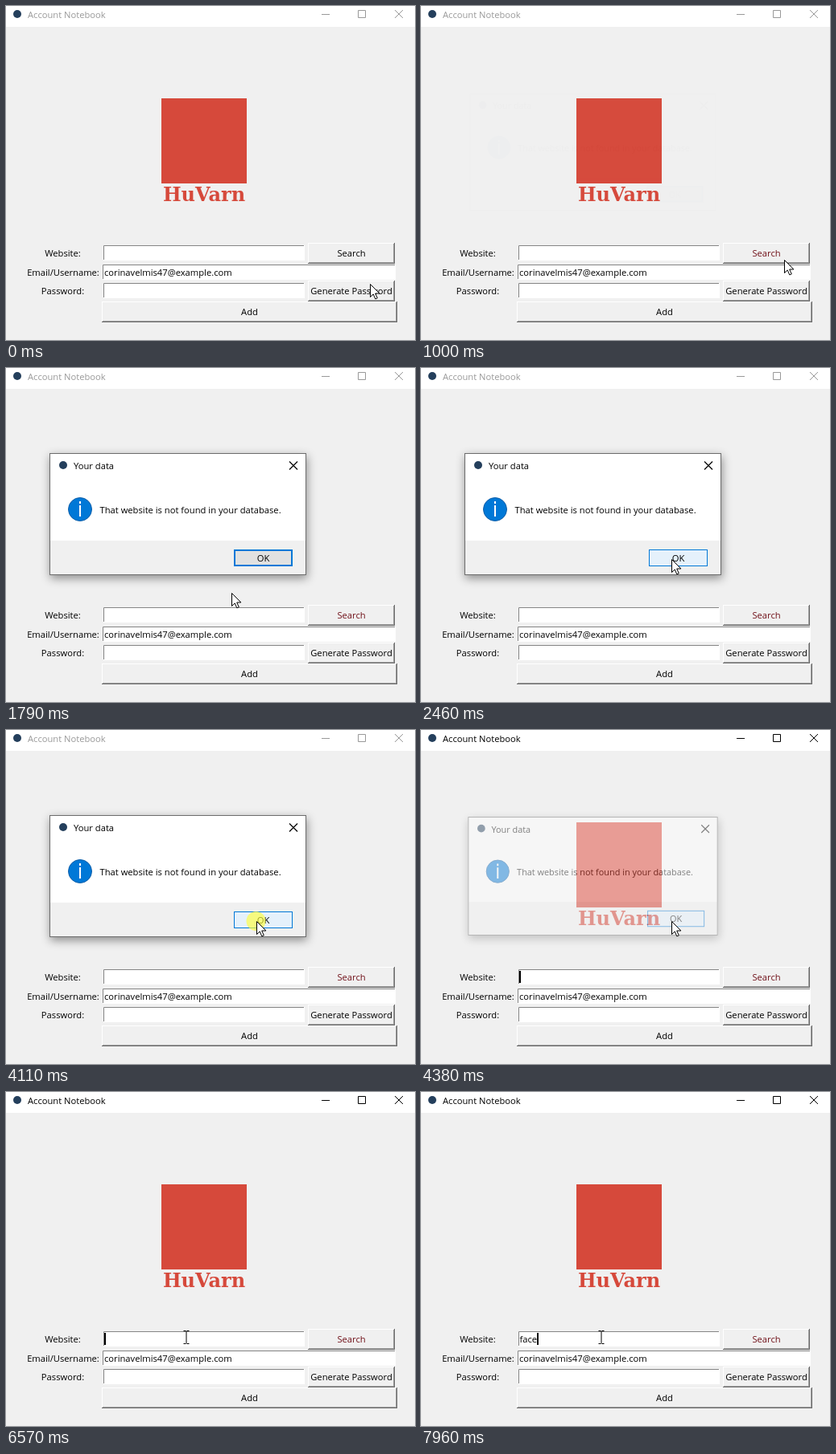
These frames come from a looping animation (508 by 416 pixels, 8000 ms). An HTML page:

```html
<!DOCTYPE html>
<html lang="en">
<head>
<meta charset="utf-8">
<title>Account Notebook</title>
<style>
html, body { margin: 0; width: 100%; height: 100%; overflow: hidden; background: #f0f0f0; }
svg { display: block; width: 508px; height: 416px; }
text { font: 11.2px "Open Sans", "Noto Sans", sans-serif; white-space: pre; }
.mid { text-anchor: middle; }
.brand { font: bold 24px "DejaVu Serif", "Noto Serif", serif; fill: #d6493b; }
.shadow { filter: drop-shadow(1px 4px 6px rgba(0, 0, 0, .42)); }
</style>
</head>
<body>
<svg id="stage" viewBox="0 0 508 416">
  <rect width="508" height="416" fill="#f0f0f0"/>
  <rect width="508" height="26" fill="#fff"/>
  <circle cx="14" cy="10" r="5" fill="#243f5c"/>
  <text id="title" x="27" y="15">Account Notebook</text>
  <path id="controls" fill="none" d="M392 10.5h10M437.5 5.5h9v9h-9zM483 5l10 10M493 5l-10 10"/>

  <rect x="193" y="115" width="106" height="106" fill="#d6493b"/>
  <text class="brand mid" x="246" y="243">HuVarn</text>

  <g id="form"></g>
  <text id="typed" x="122.5" y="312"></text>
  <rect id="caret" y="300" width="2" height="15"/>

  <g id="dialog">
    <rect class="shadow" x="54" y="106" width="319" height="152" fill="#fff"/>
    <rect x="54" y="215" width="319" height="43" fill="#f0f0f0"/>
    <rect x="54.5" y="106.5" width="318" height="151" fill="none" stroke="#6c6c6c"/>
    <circle cx="71" cy="121" r="5" fill="#243f5c"/>
    <text x="84" y="126">Your data</text>
    <path d="M352 116.500l10 10M362 116.500l-10 10" stroke="#000" stroke-width="1.200"/>
    <circle cx="92" cy="176" r="14.500" fill="#0078d7" stroke="#0f5fa8"/>
    <path d="M91 166h2v3h-2zM91 171h2v14h-2z" fill="#fff"/>
    <text x="116.500" y="181">That website is not found in your database.</text>
    <rect id="ok"/>
    <text class="mid" x="319.500" y="241">OK</text>
  </g>

  <circle id="click" r="12" fill="#ffff3c" opacity=".65"/>
  <path id="arrow" d="M.5.5v16l3.700-3.600 2.600 6 2.500-1.100-2.600-5.800h5.200z" fill="#fff" stroke="#000"/>
  <path id="beam" d="M-3.500-7.500h3M.5-7.500h3M0-7V8M-3.500 8.500h3M.5 8.500h3" fill="none" stroke="#000"/>
</svg>
<script>
const LOOP = 8000;
const $ = id => document.getElementById(id);
const set = (el, attrs) => { for (const k in attrs) el.setAttribute(k, attrs[k]); };
const show = (el, on) => el.setAttribute('visibility', on ? 'visible' : 'hidden');
const within = (t, a, b) => t >= a && t < b;
const clamp = v => Math.max(0, Math.min(1, v));

const label = (text, x, y, id = '') => `<text class="mid" id="${id}" x="${x}" y="${y}">${text}</text>`;

const button = (text, x, y, w, h, id) => `
  <rect x="${x}" y="${y}" width="${w}" height="${h}" fill="#696969"/>
  <rect x="${x}" y="${y}" width="${w - 1}" height="${h - 1}" fill="#fff"/>
  <rect x="${x + 1}" y="${y + 1}" width="${w - 2}" height="${h - 2}" fill="#a0a0a0"/>
  <rect x="${x + 1}" y="${y + 1}" width="${w - 3}" height="${h - 3}" fill="#f0f0f0"/>
  ${label(text, x + w / 2, y + 17, id)}`;

const entry = (x, y, w, h) => `
  <rect x="${x}" y="${y}" width="${w}" height="${h}" fill="#fff"/>
  <path d="M${x + .5} ${y + h - 1}V${y + .5}H${x + w - 1}" fill="none" stroke="#858585"/>`;

$('form').innerHTML =
  label('Website:', 70.5, 312) + label('Email/Username:', 71, 336) + label('Password:', 70.5, 359) +
  entry(121, 298, 250, 19) + entry(120, 322, 364, 19) + entry(121, 345, 250, 19) +
  '<text x="122" y="336">corinavelmis47@example.com</text>' +
  button('Search', 375, 295, 108, 26, 'search') +
  button('Generate Password', 375, 342, 108, 26) +
  button('Add', 119, 368, 367, 26);

// Pointer stops: time, x, y
const path = [
  [0, 452, 346], [60, 452, 346], [70, 451, 333], [200, 451, 333], [340, 451, 316],
  [1400, 451, 316], [1590, 341, 315], [1780, 341, 315], [1790, 280, 280],
  [1930, 277, 271], [2460, 311, 238], [4600, 311, 238], [5040, 392, 416],
  [6160, 266, 317], [6170, 266, 317], [6300, 222, 278], [6430, 222, 278],
  [6440, 223, 292], [6570, 224, 305], [LOOP, 224, 305]
];
const keys = [[7430, 'f'], [7560, 'a'], [7630, 'c'], [7830, 'e']];

function pointer(t) {
  const i = path.findIndex(p => p[0] > t);
  const [t0, x0, y0] = path[i - 1], [t1, x1, y1] = path[i];
  const k = (t - t0) / (t1 - t0);
  return [x0 + (x1 - x0) * k, y0 + (y1 - y0) * k];
}

function drawDialog(t) {
  const closing = t > 4240;
  const k = closing ? 1 - clamp((t - 4240) / 260) : 1 - (1 - clamp((t - 1000) / 240)) ** 2;
  const scale = closing ? .95 + .05 * k : .96 + .04 * k;
  show($('dialog'), k > 0);
  set($('dialog'), {
    opacity: k,
    transform: `translate(213.5 182) scale(${scale}) translate(-213.5 -182)`
  });
  const hover = t >= 2330, b = hover ? 1 : 2;
  set($('ok'), {
    x: 283 + b / 2, y: 226 + b / 2, width: 73 - b, height: 21 - b,
    fill: hover ? '#e5f1fb' : '#e1e1e1', stroke: '#0078d7', 'stroke-width': b
  });
}

function draw(t) {
  const active = within(t, 800, 1000) || t >= 4240;
  const ink = active ? '#000' : '#999';
  set($('title'), { fill: ink });
  set($('controls'), { stroke: ink });
  set($('search'), { fill: t >= 800 ? '#701018' : '#000' });

  const typed = $('typed');
  typed.textContent = keys.filter(k => t >= k[0]).map(k => k[1]).join('');
  const end = typed.textContent ? typed.getComputedTextLength() : 0;
  set($('caret'), { x: Math.round(122 + end) });
  show($('caret'), t >= 7960 || (t >= 4310 && (t - 4310) % 930 < 600));

  drawDialog(t);

  const [x, y] = pointer(t);
  const at = { transform: `translate(${Math.round(x)} ${Math.round(y)})` };
  set($('arrow'), at);
  set($('beam'), at);
  set($('click'), { cx: x - .5, cy: y });
  show($('arrow'), t < 5040 || within(t, 6170, 6440));
  show($('beam'), t >= 6440);
  show($('click'), within(t, 800, 1000) || within(t, 4110, 4310) || within(t, 6900, 7100));
}

const start = performance.now();
function tick() {
  draw((performance.now() - start) % LOOP);
  requestAnimationFrame(tick);
}
tick();
</script>
</body>
</html>
```
